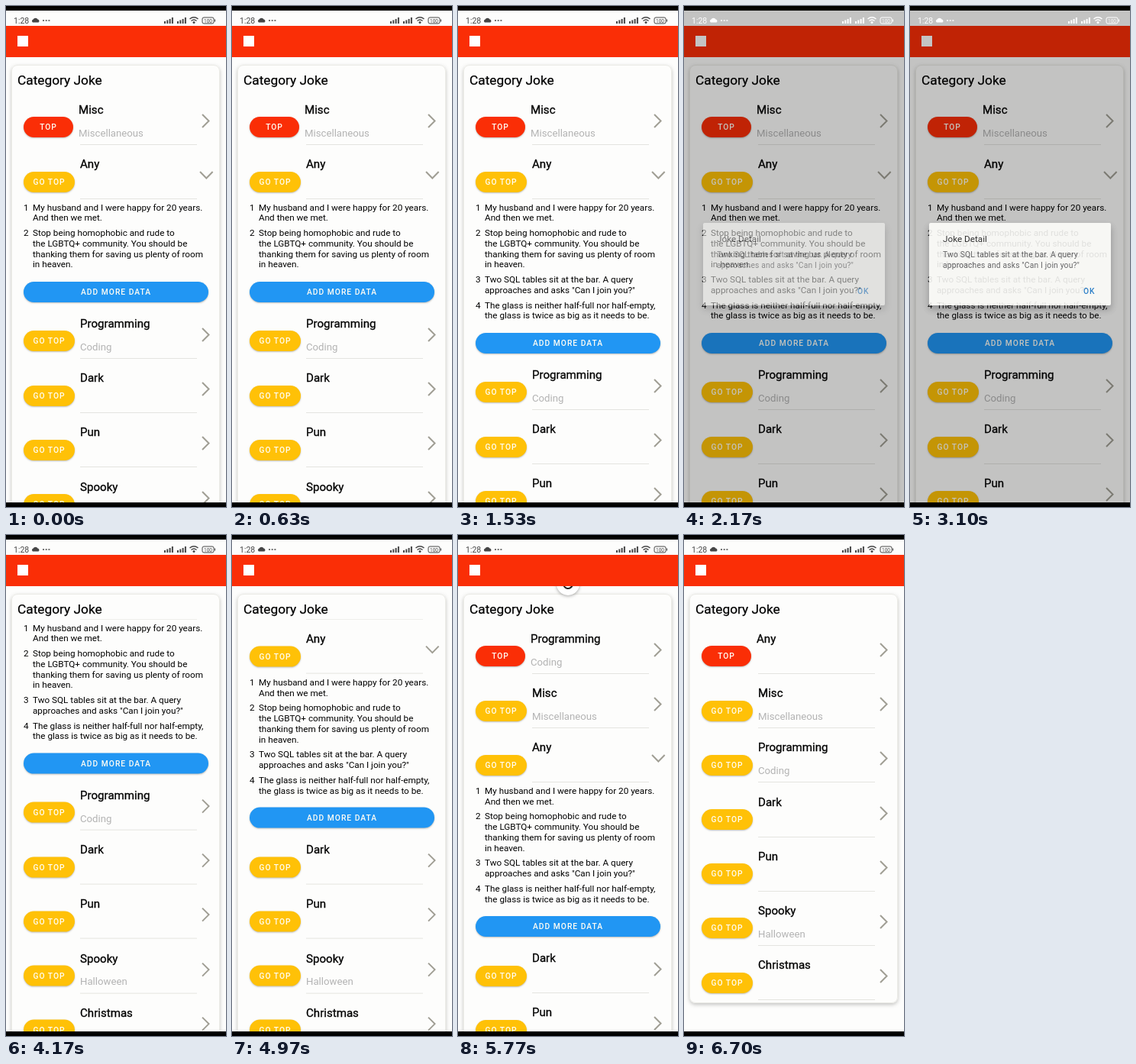
Recreate the animation shown at these times as an HTML page. Size 288 by 656 pixels, loop 6.73 s.

```html
<!DOCTYPE html>
<html lang="en">
<head>
<meta charset="utf-8">
<title>Category Joke</title>
<style>
html, body { margin: 0; width: 100%; height: 100%; overflow: hidden; background: #000; }
#stage { position: absolute; left: 0; top: 0; width: 288px; height: 656px; overflow: hidden;
  background: #000; font-family: Roboto, Arial, sans-serif; color: #000; }
#stage div, #stage svg { position: absolute; white-space: pre; }
#page { left: 0; top: 6px; width: 288px; height: 644px; overflow: hidden; background: #fdfdfc; }
#view { left: 0; top: -6px; width: 288px; height: 656px; }
#header { left: 0; top: 26px; width: 288px; height: 41px; background: #fa2e06; }
#logo { left: 15px; top: 13px; width: 14px; height: 14px; background: #fff; }
#card { left: 7px; top: 77px; width: 273px; border-radius: 8px; border: 1px solid #ebebe6;
  box-sizing: border-box; box-shadow: 0 2px 5px rgba(90, 90, 85, .35); }
#title { left: 15px; top: 87px; line-height: 20px; font-size: 17.3px; -webkit-text-stroke: .25px; }
#clip { left: 0; top: 110px; width: 288px; height: 540px; overflow: hidden; }
#list { left: 0; top: 0; width: 288px; }
.row { left: 0; width: 288px; }
.row svg { left: 0; top: 0; }
.name { top: 16px; line-height: 20px; font-size: 15.1px; -webkit-text-stroke: .3px; }
.sub { top: 46.5px; line-height: 20px; font-size: 13.2px; color: #b3b3b3; }
.line { left: 97px; top: 71px; width: 153px; height: 1px; background: #e4e4e0; }
.btn { left: 23px; height: 27px; line-height: 27px; border-radius: 14px; text-align: center; color: #fffdf4;
  font-size: 10.27px; font-weight: 500; letter-spacing: 1px; box-shadow: 0 1px 2px rgba(70, 70, 60, .35); }
.joke { left: 35px; font-size: 11.73px; line-height: 13.75px; }
.num { left: -12px; top: 0; }
#dim { left: 0; top: 6px; width: 288px; height: 644px; background: #000; }
#dialog { left: 25px; top: 284px; width: 238px; height: 108px; background: #fffffc; border-radius: 2px;
  box-shadow: 0 5px 10px rgba(45, 45, 50, .4); }
#dialog div { left: 18px; }
#head { top: 14px; font-size: 11.73px; line-height: 15px; color: #222; }
#msg { top: 35px; font-size: 10.27px; line-height: 13.5px; letter-spacing: .18px; color: #58585a; }
#dialog #ok { left: 202px; top: 82px; font-size: 10.27px; line-height: 15px; font-weight: 500;
  letter-spacing: .9px; color: #1976c8; }
#spin { left: 129px; width: 30px; height: 30px; border-radius: 50%; background: #fff;
  box-shadow: 0 1px 4px rgba(0, 0, 0, .35); }
#spin svg { left: 0; top: 0; }
#status { left: 0; top: 6px; }
</style>
</head>
<body>
<div id="stage">
  <div id="page"><div id="view">
    <div id="card"></div>
    <div id="title">Category Joke</div>
    <div id="clip"><div id="list"></div></div>
    <div id="spin"><svg width="30" height="30" viewBox="-15 -15 30 30"><path id="arc" d="M0-6A6 6 0 1 1-6 0" fill="none" stroke="#222" stroke-width="2"/></svg></div>
    <div id="header"><div id="logo"></div></div>
  </div></div>
  <div id="dim"></div>
  <svg id="status" width="288" height="20" fill="currentColor">
    <text x="10" y="16.5" font-size="10.5">1:28</text>
    <path d="M35 15.5a2.2 2.2 0 0 1 .6-4 3.4 3.4 0 0 1 6 0 2.2 2.2 0 0 1 .9 4z"/>
    <path d="M48 13h2m1.7 0h2m1.7 0h2" stroke="currentColor" stroke-width="1.7"/>
    <path id="bars" stroke="currentColor" stroke-width="2"/>
    <path d="M240.5 11q5.5-4.5 11 0M242.5 13.5q3.5-2.8 7 0" fill="none" stroke="currentColor" stroke-width="1.5"/>
    <circle cx="246" cy="15.5" r="1.5"/>
    <rect x="257" y="9" width="15" height="8" rx="2" fill="none" stroke="currentColor"/>
    <path d="M273 11.5h1v3h-1z"/>
    <text x="264.5" y="15.5" font-size="6.5" text-anchor="middle">100</text>
  </svg>
  <div id="dialog">
    <div id="head">Joke Detail</div>
    <div id="msg">Two SQL tables sit at the bar. A query
approaches and asks "Can I join you?"</div>
    <div id="ok">OK</div>
  </div>
</div>
<script>
const LOOP = 6730, ROW = 71.2, LINE = 13.75;
const $ = id => document.getElementById(id);
const subs = { Misc: 'Miscellaneous', Programming: 'Coding', Spooky: 'Halloween' };
const rest = ['Dark', 'Pun', 'Spooky', 'Christmas'];
const jokes = [
  'My husband and I were happy for 20 years.\nAnd then we met.',
  'Stop being homophobic and rude to\nthe LGBTQ+ community. You should be\nthanking them for saving us plenty of room\nin heaven.',
  'Two SQL tables sit at the bar. A query\napproaches and asks "Can I join you?"',
  'The glass is neither half-full nor half-empty,\nthe glass is twice as big as it needs to be.'
];

// Start time, row order, number of open jokes
const states = [
  [0, ['Misc', 'Any', 'Programming'], 2],
  [1150, ['Misc', 'Any', 'Programming'], 4],
  [4600, ['Programming', 'Misc', 'Any'], 4],
  [6250, ['Any', 'Misc', 'Programming'], 0]
];

const ramp = (t, a, b) => Math.min(1, Math.max(0, (t - a) / (b - a)));
const ease = x => 1 - (1 - x) ** 3;
const button = (text, color, width, top) =>
  `<div class="btn" style="top:${top}px;width:${width}px;background:${color}">${text}</div>`;

function row(name, i, y, open) {
  const first = i === 0, x = first ? 95 : 97;
  const chevron = open ? 'M254 36l8.3 8.5 8.3-8.5' : 'M257 32l8.5 8.5-8.5 8.5';
  return `<div class="row" style="top:${y}px">
    <div class="name" style="left:${x}px">${name}</div>
    <div class="sub" style="left:${x}px">${subs[name] || ''}</div>
    <div class="line"></div>
    ${first ? button('TOP', '#fa2e06', 65, 35.4) : button('GO TOP', '#ffc107', 67, 35.4)}
    <svg width="288" height="71"><path d="${chevron}" fill="none" stroke="#a09e94" stroke-width="2"/></svg></div>`;
}

function build([, top, count]) {
  let y = 0, html = '';
  [...top, ...rest].forEach((name, i) => {
    const open = name === 'Any' && count > 0;
    html += row(name, i, y, open);
    y += ROW;
    if (!open) return;
    y += 5.2;
    jokes.slice(0, count).forEach((text, n) => {
      html += `<div class="joke" style="top:${y}px"><div class="num">${n + 1}</div>${text}</div>`;
      y += text.split('\n').length * LINE + 6;
    });
    html += button('ADD MORE DATA', '#2196f3', 242, y + 9);
    y += 37.9;
  });
  $('list').innerHTML = html;
  $('card').style.height = y + 38 + 'px';
}

$('bars').setAttribute('d', [208, 225].map(x =>
  [3, 4.5, 6, 8].map((h, i) => `M${x + i * 3.3} 17v${-h}`).join('')).join(''));

let shown;
function draw(now) {
  const t = now % LOOP;
  const state = states.filter(s => s[0] <= t).pop();
  if (state !== shown) build(shown = state);

  const scroll = 2 * ROW * (ease(ramp(t, 3530, 4120)) - ease(ramp(t, 5150, 5650)));
  $('list').style.transform = `translateY(${-scroll}px)`;

  const dim = ramp(t, 2110, 2165) - ramp(t, 3110, 3290);
  $('dim').style.opacity = dim * .23;
  const ink = 70 + 185 * dim;
  $('status').style.color = `rgb(${ink},${ink},${ink})`;
  $('dialog').style.opacity = ramp(t, 2125, 2215) - ramp(t, 3080, 3250);

  const pull = ease(ramp(t, 5750, 6020)), out = ramp(t, 6330, 6520);
  $('spin').style.top = 35 + 64 * pull + 'px';
  $('spin').style.transform = `scale(${1 - out})`;
  $('spin').style.visibility = pull > 0 && out < 1 ? 'visible' : 'hidden';
  $('arc').setAttribute('transform', `rotate(${(t - 5750) * .45})`);
  requestAnimationFrame(frame);
}
const start = performance.now();
function frame() { draw(performance.now() - start); }
frame();
</script>
</body>
</html>
```
